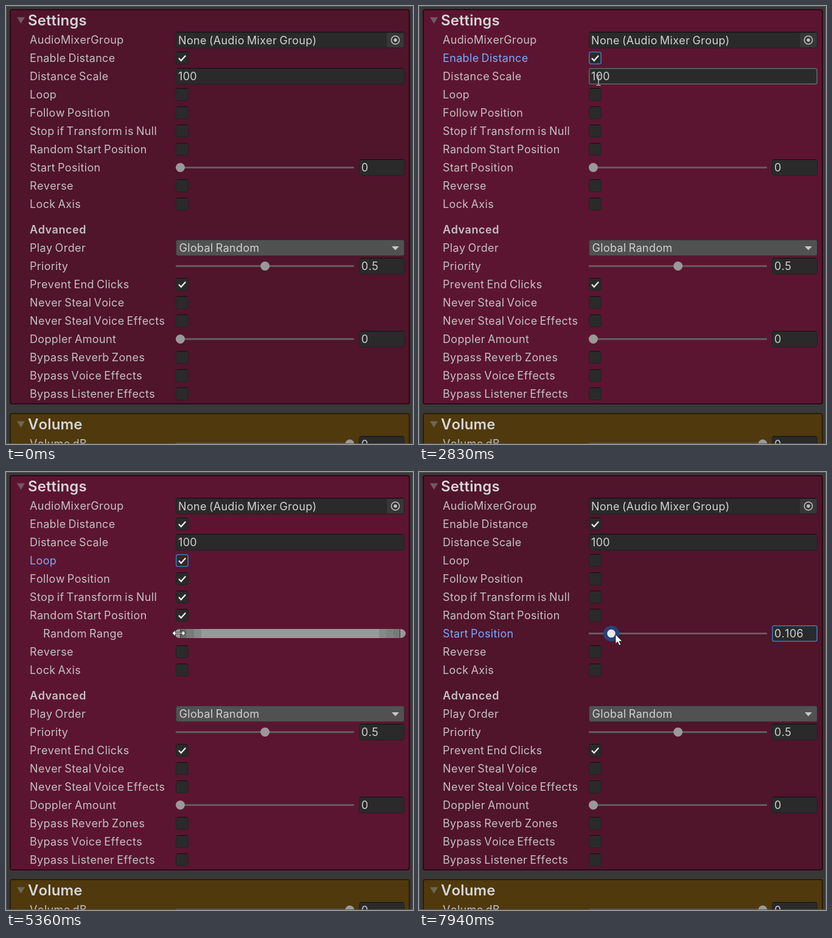
Recreate the animation shown at these times as an HTML page. Size 669x720 px, loop 8 s.

```html
<!DOCTYPE html>
<html lang="en">
<head>
<meta charset="utf-8">
<title>Settings panel</title>
<style>
html, body { margin: 0; width: 100%; height: 100%; overflow: hidden; background: #383838; }
svg { display: block; width: 669px; height: 720px; }
text {
  font: 18px Inter, Roboto, sans-serif; letter-spacing: .34px; word-spacing: -1.3px;
  fill: #c2c2c2; font-kerning: none; font-optical-sizing: none; white-space: pre;
}
.title { font-size: 24px; font-weight: 600; letter-spacing: .1px; fill: #d6d6d6; }
.sub { font-weight: 600; letter-spacing: .55px; }
.value { fill: #d2d2d2; }
.focus { fill: #7baafb; }
</style>
</head>
<body>
<svg id="stage" viewBox="0 0 669 720"></svg>
<script>
const stage = document.getElementById('stage');
const LENGTH = 8000, BLUE = '#3a79bb', HOVER = '#656565';

// Places the pointer visits, and the spans of the three drags
const enable = [287, 82], loop = [288, 146], low = [284, 265], grab = [293, 266];
const dragLow = [5420, 5640], dragHigh = [5800, 5960], dragStart = [7700, 7940];

// Each move: [start, end], goal, bow of the path
const moves = [
  [[740, 1430], enable], [[1820, 1880], [315, 78]], [[2090, 2350], enable],
  [[2650, 2830], [295, 122]], [[2860, 3360], loop, [0, 34]], [[4230, 5010], low, [40, 0]],
  [dragLow, [341, 265]], [[5640, 5800], [650, 265]], [dragHigh, [594, 265]],
  [[5960, 6130], [402, 272]], [[6190, 6690], loop], [[7170, 7640], grab], [dragStart, [323, 267]]
];

const within = (t, a, b) => t >= a && t < b;

function ease(t, [a, b]) {
  const p = Math.min(1, Math.max(0, (t - a) / (b - a)));
  return p * p * (3 - 2 * p);
}

function pointerAt(t) {
  let at = [78, 140];
  for (const [span, goal, bow = [0, 0]] of moves) {
    const p = ease(t, span);
    at = at.map((v, i) => v + (goal[i] - v) * p + bow[i] * Math.sin(Math.PI * p));
  }
  return at;
}

const rect = (x, y, w, h, fill, more = '') =>
  `<rect x="${x}" y="${y}" width="${w}" height="${h}" fill="${fill}" ${more}/>`;
const circle = (x, y, r, fill, more = '') =>
  `<circle cx="${x}" cy="${y}" r="${r}" fill="${fill}" ${more}/>`;
const shape = (d, fill, more = '') => `<path d="${d}" fill="${fill}" ${more}/>`;
const line = (d, color, width = 1) =>
  shape(d, 'none', `stroke="${color}" stroke-width="${width}"`);
const text = (x, y, s, cls = '') => `<text x="${x}" y="${y}" class="${cls}">${s}</text>`;
const label = (y, s, focus, x = 39) => text(x, y + 6, s, focus ? 'focus' : '');

function box(x, y, w, h, border) {
  const edge = border ? 1.6 : 1;
  return rect(x + edge / 2, y + edge / 2, w - edge, h - edge, '#2a2a2a',
    `rx="3" stroke="${border || '#212121'}" stroke-width="${edge}"`) +
    (border ? '' : line(`M${x + 2} ${y + .5}h${w - 4}`, '#0f0f0f'));
}

const field = (y, x, w, s, border) =>
  box(x, y - 14, w, 27, border) + text(x + 4, y + 6, s, 'value');

const toggle = (y, s, on, focus) =>
  label(y, s, focus) + box(279, y - 11, 21, 21, focus && BLUE) +
  (on ? line(`M284 ${y - .3}l3.8 4 7.4-8.2`, '#eee', 2.3) : '');

const toggles = (y, names, on) => names.map((s, i) => toggle(y + 30 * i, s, on)).join('');

function slider(y, s, v, focus) {
  const x = 286.5 + 278.5 * v;
  return label(y, s, focus) + rect(279, y - 2, 293, 3, '#5e5e5e') +
    (focus ? circle(x, y - .5, 13, '#26427c') : '') +
    circle(x, y - .5, focus ? 6.7 : 7.5, focus ? '#e8e8e8' : '#999') +
    field(y, 580, 75, +v.toFixed(3), focus && BLUE);
}

function range(y, lo, hi, bright) {
  const top = y - 8, step = (hi - lo) * .032;
  let bands = '';
  for (let i = 0; i < 3; i++) {
    const grey = g => `rgb(${g},${g},${g})`;
    bands += rect(lo + i * step, top, step, 15, grey(108 + 14 * i)) +
      rect(hi - (i + 1) * step, top, step, 15, grey(120 + 8 * i));
  }
  return label(y, 'Random Range', false, 61) + rect(279, y - 2, 376, 3, '#5e5e5e') +
    shape(`M${lo} ${top}a9 7.5 0 0 0 0 15zM${hi} ${top}a9 7.5 0 0 1 0 15z`, bright ? '#dcdcdc' : '#999') +
    rect(lo, top, hi - lo, 15, '#999') + bands +
    line(`M${lo + .5} ${top}v15M${hi - .5} ${top}v15`, '#333');
}

const panel = (y, h, fill, edge, title) =>
  rect(7, y, 656, h, fill, `rx="3" stroke="${edge}" stroke-width="2"`) +
  shape(`M18 ${y + 12.5}h13l-6.5 10.5z`, '#808080', 'fill-opacity=".65"') +
  text(36, y + 26, title, 'title');

function pointer(t, typing) {
  if (t < moves[0][0][0]) return '';
  const resizing = within(t, 4900, 5660) || within(t, 5770, 5990);
  const icon = typing ? line('M-3.5-8.5h3M.5-8.5h3M0-8V8M-3.5 8.5h3M.5 8.5h3', '#e4e4e4', 1.1)
    : shape(resizing ? 'M-11 0l5.5-5v4h11v-4L11 0 5.5 5V1h-11v4z'
      : 'M0 0V15.5l3.5-3.3 2.6 5.8 2.6-1.2-2.6-5.6h4.9z', '#fff', 'stroke="#111" stroke-width=".8"');
  return `<g transform="translate(${pointerAt(t)})">${icon}</g>`;
}

function draw(t) {
  const far = !within(t, 1640, 2510);
  const looped = within(t, 4050, 6930);
  const typing = within(t, 2740, 2890);
  const lit = within(t, 740, 3870) || within(t, 5060, 5900);

  stage.innerHTML = rect(0, 0, 669, 720, '#383838') +
    line('M.5 720V.5h668V720', '#575757') +
    panel(6, 648, lit ? '#5c1530' : '#50142b', '#2b0917', 'Settings') +
    label(56, 'AudioMixerGroup') + field(56.5, 279, 376, 'None (Audio Mixer Group)') +
    rect(626, 44, 28, 24, '#373737', 'rx="2"') +
    circle(640, 56, 6.7, 'none', 'stroke="#c4c4c4" stroke-width="1.5"') + circle(640, 56, 2.7, '#c4c4c4') +
    toggle(86, 'Enable Distance', far, within(t, 1580, 3900)) +
    `<g opacity="${far ? 1 : .45}">` + label(116, 'Distance Scale') +
    field(116, 279, 376, '100', typing && HOVER) + '</g>' +
    toggle(146, 'Loop', looped, within(t, 3900, 7640)) +
    toggles(176, ['Follow Position', 'Stop if Transform is Null', 'Random Start Position'], looped) +
    (looped
      ? range(266, 286 + 57 * ease(t, dragLow), 648 - 57 * ease(t, dragHigh), within(t, 5420, 6300))
      : slider(266, 'Start Position', .106 * ease(t, dragStart), t >= 7640)) +
    toggles(296, ['Reverse', 'Lock Axis']) +
    text(39, 374, 'Advanced', 'sub') +
    label(398, 'Play Order') +
    rect(279.5, 384.5, 375, 26, '#515151', 'rx="3" stroke="#303030"') +
    text(284.5, 404, 'Global Random', 'value') + shape('M634 395h12l-6 6.5z', '#c8c8c8') +
    slider(428, 'Priority', .5) +
    toggle(458, 'Prevent End Clicks', true) +
    toggles(488, ['Never Steal Voice', 'Never Steal Voice Effects']) +
    slider(548, 'Doppler Amount', 0) +
    toggles(578, ['Bypass Reverb Zones', 'Bypass Voice Effects', 'Bypass Listener Effects']) +
    panel(670, 80, '#4f390d', '#2a1e06', 'Volume') +
    label(720, 'Volume dB') + rect(279, 718, 293, 3, '#5e5e5e') +
    circle(565, 720, 7.5, '#999') + field(721, 580, 75, '0') +
    line('M0 719.5h669', '#575757') +
    pointer(t, typing);
}

function tick() {
  draw(performance.now() % LENGTH);
  requestAnimationFrame(tick);
}
tick();
</script>
</body>
</html>
```
